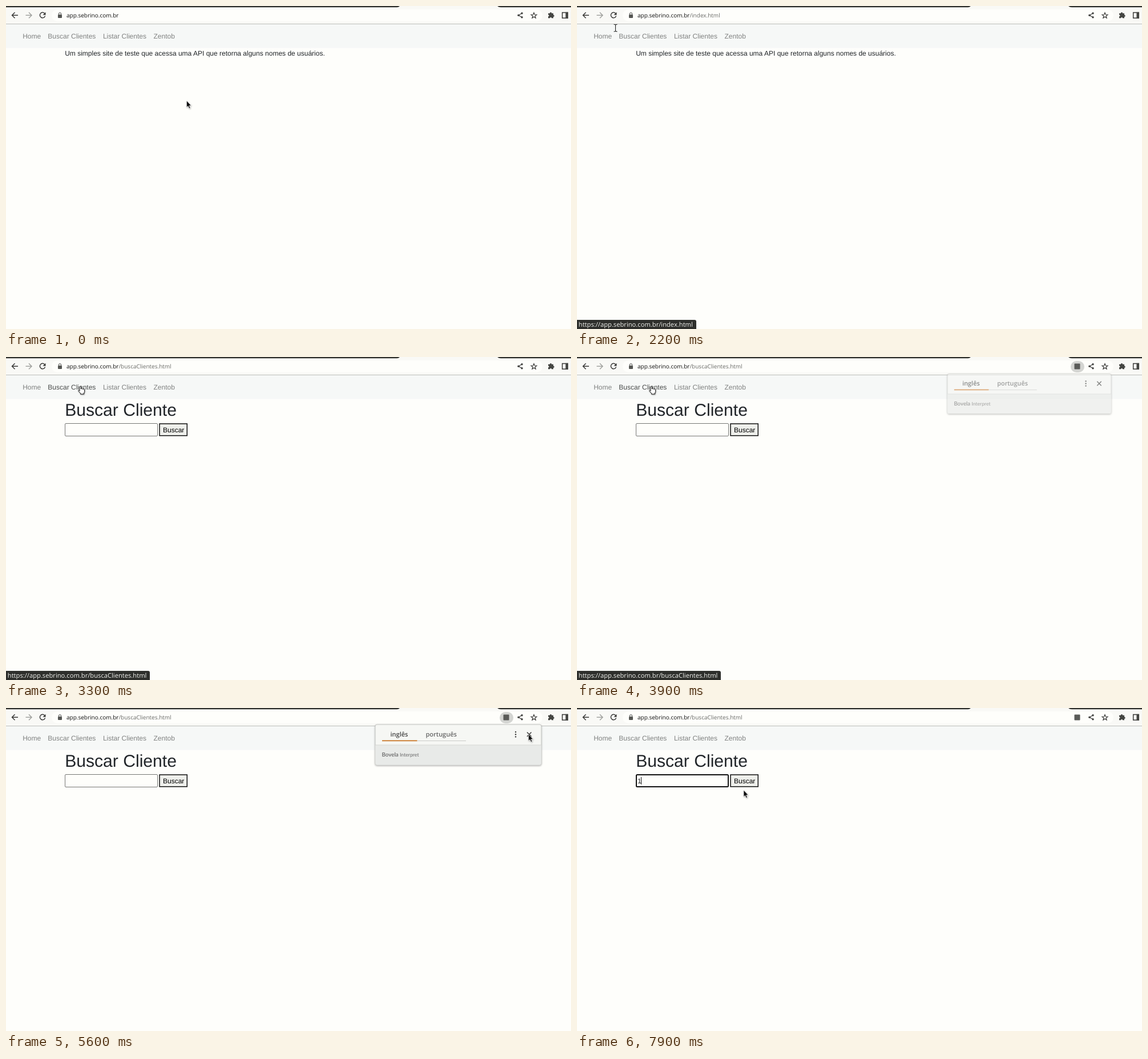
Write an HTML page that moves like this. It is 990x566 px and loops after 8000 ms.

```html
<!DOCTYPE html>
<html lang="pt-BR">
<head>
<meta charset="utf-8">
<title>Buscar Clientes</title>
<style>
  html, body { margin: 0; width: 100%; height: 100%; overflow: hidden; background: #fefefb; }
  svg { display: block; width: 990px; height: 566px; }
  text { font-family: "Liberation Sans", Arial, sans-serif; font-size: 12px; fill: #212529; text-rendering: geometricPrecision; white-space: pre; }
  .ui { font-family: "Open Sans", "Noto Sans", sans-serif; }
  .url { font-size: 10px; fill: #111; }
  .tab { font-size: 11px; font-weight: 600; fill: #444; }
  .brand { font-family: Lato, sans-serif; font-size: 8.7px; fill: #666; }
  .nav text { fill: #808281; }
  .nav text.hot { fill: #4a4c4b; }
  .line { fill: none; stroke: #3a3a38; stroke-width: 1.5; }
</style>
</head>
<body>
<svg viewBox="0 0 990 566" xmlns="http://www.w3.org/2000/svg">
  <defs>
    <filter id="soft" x="-10%" y="-20%" width="120%" height="150%">
      <feDropShadow dx="0" dy="1" stdDeviation="1.5" flood-opacity=".35"/>
    </filter>
    <filter id="drop" x="-40%" y="-40%" width="200%" height="200%">
      <feDropShadow dx=".6" dy="1" stdDeviation=".8" flood-opacity=".4"/>
    </filter>
  </defs>

  <!-- browser bar -->
  <rect width="990" height="566" fill="#fefefb"/>
  <rect width="990" height="31" fill="#f9f9f6"/>
  <path d="M0 0H690Q688 2.300 685 2.300H0zM861 0H990V2.300H867Q863 2.300 861 0z" fill="#30312e"/>
  <rect x="80" y="6" width="860" height="21" rx="10.5" fill="#fefefb"/>
  <rect y="31" width="990" height="1" fill="#bdbebb"/>
  <g transform="translate(0 -.3)">
    <path class="line" d="M21 16.500H11M15.500 11.500L10.500 16.500L15.500 21.500"/>
    <path class="line" d="M34.500 16.500H45M40 11.500L45 16.500L40 21.500" style="stroke:#a2a3a0"/>
    <g id="reload">
      <path class="line" d="M67.600 13.200A4.700 4.700 0 1 0 68.600 17.700"/>
      <path d="M69.500 11V16H64.500z" fill="#3a3a38"/>
    </g>
    <path id="stop" class="line" d="M60 12.500L68 20.500M68 12.500L60 20.500"/>
  </g>
  <rect x="91" y="15" width="7" height="6" rx="1" fill="#555653"/>
  <path class="line" d="M92.500 15V13.700a2 2 0 0 1 4 0V15" style="stroke:#555653;stroke-width:1.1"/>
  <text class="ui url" x="106" y="20">app.sebrino.com.br<tspan id="path" fill="#6a6b68"></tspan></text>
  <g id="lang">
    <rect id="pill" x="865" y="7" width="24" height="20" rx="10" fill="#d4d5d2"/>
    <rect x="871.500" y="11.500" width="10" height="10" rx="1" fill="#5a5b58"/>
  </g>
  <g fill="#444542" transform="translate(0 -.2)">
    <path class="line" d="M904 13L898 16.500L904 20" style="stroke-width:1.1"/>
    <circle cx="904" cy="13" r="1.800"/><circle cx="898" cy="16.500" r="1.800"/><circle cx="904" cy="20" r="1.800"/>
    <path id="star" class="line" style="stroke-width:1.200"/>
    <path d="M950 13.500h2.800a1.700 1.700 0 1 1 3.400 0h2.800v2.800a1.700 1.700 0 1 1 0 3.400V22h-3a1.500 1.500 0 0 0-3 0H950v-3a1.500 1.500 0 0 0 0-3z" transform="translate(0 -.5)"/>
    <rect x="974.700" y="11.700" width="9.600" height="9.600" class="line"/>
    <rect x="980.500" y="11" width="4.500" height="11"/>
  </g>

  <!-- page -->
  <rect y="32" width="990" height="41.500" fill="#f6f8f7"/>
  <g class="nav" id="nav">
    <text x="29.200" y="56.500">Home</text>
    <text x="73.300" y="56.500">Buscar Clientes</text>
    <text x="169.900" y="56.500">Listar Clientes</text>
    <text x="258.500" y="56.500">Zentob</text>
  </g>
  <text id="home" x="103.200" y="87">Um simples site de teste que acessa uma API que retorna alguns nomes de usuários.</text>
  <g id="search">
    <text x="103.200" y="102.700" style="font-size:30.1px">Buscar Cliente</text>
    <rect id="field" rx="1.500" fill="#fefefb"/>
    <text id="typed" x="106" y="131.500">1</text>
    <rect id="caret" y="121" width="1" height="13" fill="#111"/>
    <rect x="269" y="117" width="48.300" height="20.800" fill="#eeefeb" stroke="#111" stroke-width="1.500"/>
    <text x="275" y="131.500" style="fill:#000">Buscar</text>
  </g>

  <!-- translation bubble -->
  <g id="popup">
    <rect x="647" y="29" width="291" height="71" rx="3" fill="#f6f7f4" stroke="#b9bab7" stroke-width=".8" filter="url(#soft)"/>
    <path d="M647.400 65H937.600V97a2.600 2.600 0 0 1-2.600 2.600H650a2.600 2.600 0 0 1-2.600-2.600z" fill="#e8eae8"/>
    <rect x="647" y="64.500" width="291" height=".8" fill="#cfd0cd"/>
    <text class="ui tab" x="673.500" y="50">inglês</text>
    <text class="ui tab" x="735.500" y="50" style="fill:#666">português</text>
    <rect x="721" y="57" width="85" height="1" fill="#c9cac7"/>
    <rect x="659" y="56.500" width="61.500" height="1.700" fill="#c8701f"/>
    <g fill="#3a3a38"><circle cx="893" cy="42" r="1.200"/><circle cx="893" cy="46.200" r="1.200"/><circle cx="893" cy="50.400" r="1.200"/></g>
    <path class="line" d="M913 42.500L920.500 50M920.500 42.500L913 50"/>
    <text class="brand" x="658.500" y="85"><tspan font-weight="600" style="font-size:9.8px">Bovela</tspan> Interpret</text>
  </g>

  <g id="status">
    <path id="plate" fill="#2e2f2c"/>
    <text id="hint" class="ui" x="2.800" y="562.300" style="font-size:11.2px;fill:#f1f2ee"></text>
  </g>

  <g id="cursor">
    <path id="arrow" d="M0 0V11.500L2.600 9.300L4.500 13.600L6.400 12.800L4.600 8.600H8z" fill="#111" stroke="#fff" stroke-width=".6" filter="url(#drop)"/>
    <path id="hand" d="M3 8.500V1.600a1.200 1.200 0 0 1 2.400 0V5a1.100 1.100 0 0 1 2.100 .3a1.100 1.100 0 0 1 2.100 .4a1 1 0 0 1 2 .6V9.500Q11.600 11 10.500 12V14H4.500V12.500L.8 8.600Q.3 7.500 1.300 7.200T3 8.500z" fill="#fff" stroke="#111" stroke-width="1" filter="url(#drop)"/>
    <path id="beam" d="M-3 -6.200Q0 -6.200 0 -5Q0 -6.200 3 -6.200M0 -5V5M-3 6.200Q0 6.200 0 5Q0 6.200 3 6.200" fill="none" stroke="#222" stroke-width="1.100"/>
  </g>
</svg>
<script>
const LOOP = 8000, STEP = 100;
const $ = id => document.getElementById(id);
const show = (id, on) => { $(id).style.display = on ? "" : "none"; };
const set = (id, attrs) => {
  for (const name in attrs) $(id).setAttribute(name, attrs[name]);
};

// each row: start time, then values held until the next row
const pointer = [
  [0, "arrow", 316.5, 166], [600, "arrow", 309, 169.5],
  [800, "arrow", 272, 148], [900, "arrow", 196, 108], [1000, "arrow", 112, 74],
  [1100, "hand", 46, 54], [1200, "hand", 36, 50], [1700, "hand", 37, 52], [1900, "hand", 47, 60],
  [2100, "hand", 53, 47], [2200, "beam", 67.5, 38.5], [2300, "arrow", 82, 36], [2400, "arrow", 100, 37],
  [2500, "hand", 120, 42], [2600, "hand", 134, 46], [2700, "hand", 141, 48],
  [2800, "hand", 140, 50], [2900, "hand", 138, 51], [3000, "hand", 126, 51],
  [4100, "hand", 158, 52], [4200, "hand", 200, 50],
  [4800, "arrow", 285, 51], [4900, "arrow", 410, 46], [5000, "arrow", 556, 38],
  [5100, "arrow", 678.5, 32], [5200, "arrow", 764, 30], [5300, "arrow", 832, 33],
  [5400, "arrow", 882, 39], [5500, "arrow", 908, 44], [5600, "arrow", 915.5, 46],
  [5800, "arrow", 850, 62], [5900, "arrow", 700, 90], [6000, "arrow", 510, 108],
  [6100, "arrow", 375, 103], [6200, "arrow", 331.5, 95],
  [6400, "beam", 232.5, 124.5], [6800, "beam", 229.5, 127.5], [7000, "beam", 230.5, 127.5],
  [7100, "beam", 230.5, 128.5], [7400, "beam", 243, 133], [7500, "arrow", 260, 147],
  [7600, "arrow", 278, 153], [7700, "arrow", 288, 151], [7800, "arrow", 292, 147], [7900, "arrow", 292, 144]
];
const site = "https://app.sebrino.com.br/";
const wait = "Aguardando app.sebrino.com.br...";
const status = [
  [0, "", 0], [1100, site + "index.html", 209], [1200, wait, 347], [1400, site + "index.html", 209],
  [2400, "", 0], [2500, site + "buscaClientes.html", 252], [2900, wait, 347],
  [3300, site + "buscaClientes.html", 252], [4200, site + "listaClientes.html", 244], [5200, "", 0]
];
const hover = [[0, -1], [1100, 0], [2200, -1], [2500, 1], [4200, 2], [4800, -1]];
const address = [[0, ""], [1200, "/index.html"], [2900, "/buscaClientes.html"]];
const bubble = [[0, 0, 1], [3800, .2, .97], [3900, .6, .986], [4000, 1, 1], [5700, .5, .986], [5800, 0, 1]];

const at = (rows, t) => rows.filter(r => r[0] <= t).pop();
const within = (t, a, b) => t >= a && t < b;

$("star").setAttribute("d", "M" + Array.from({ length: 10 }, (_, i) => {
  const r = i % 2 ? 2.2 : 5.2, a = Math.PI * (i / 5 - .5);
  return (925 + r * Math.cos(a)).toFixed(2) + " " + (17 + r * Math.sin(a)).toFixed(2);
}).join("L") + "z");

// border drawn inside the outer edge of the input
function drawField(focus) {
  const w = focus ? 2 : 1;
  set("field", {
    x: 103 + w / 2, y: 116 + w / 2, width: 163 - w, height: 23 - w,
    stroke: focus ? "#111" : "#767775", "stroke-width": w
  });
}

function draw(t) {
  const loading = within(t, 1200, 1400) || within(t, 2900, 3300);
  show("stop", loading);
  show("reload", !loading);
  $("path").textContent = at(address, t)[1];

  const link = at(hover, t)[1];
  [...$("nav").children].forEach((el, i) => el.classList.toggle("hot", i === link));

  show("home", t < 2900);
  show("search", t >= 2900);
  const focus = t >= 6400, typed = t >= 7300;
  drawField(focus);
  show("typed", typed);
  show("caret", focus && (typed ? (t - 7300) % 1000 < 500 || t >= 7800 : (t - 6400) % 1000 < 500));
  set("caret", { x: typed ? 112 : 106 });

  const [, alpha, scale] = at(bubble, t);
  show("lang", t >= 3800);
  show("pill", within(t, 3800, 5700));
  show("popup", alpha > 0);
  set("popup", {
    opacity: alpha,
    transform: `translate(792.5 64.5) scale(${scale}) translate(-792.5 -64.5)`
  });

  const [, hint, width] = at(status, t);
  show("status", width > 0);
  $("hint").textContent = hint;
  set("plate", { d: `M0 550H${Math.max(width - 3, 0)}q3 0 3 3V566H0z` });

  const [, kind, x, y] = at(pointer, t);
  for (const id of ["arrow", "hand", "beam"]) show(id, id === kind);
  set("cursor", { transform: `translate(${x} ${y})` });
}

const start = performance.now();
let last = -1;
function tick() {
  const t = Math.floor(((performance.now() - start) % LOOP) / STEP) * STEP;
  if (t !== last) draw(last = t);
  requestAnimationFrame(tick);
}
tick();
</script>
</body>
</html>
```
